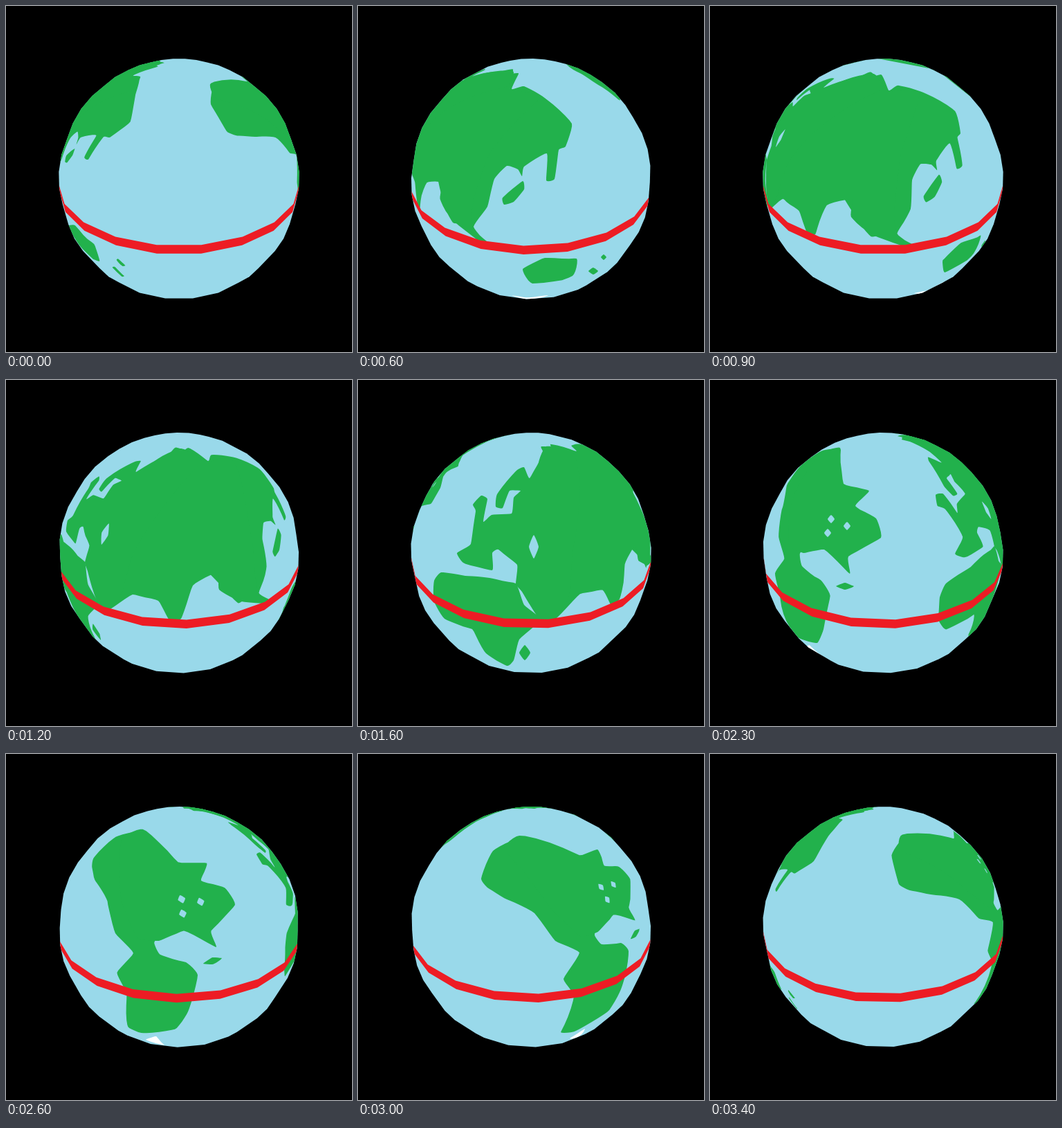
Write an HTML page with a canvas that moves like this. It is 500 px wide and 500 px high and loops after 3.5 s.

```html
<!DOCTYPE html>
<html lang="en">
<head>
<meta charset="utf-8">
<title>Spinning globe</title>
<style>
  html, body { margin: 0; width: 100%; height: 100%; overflow: hidden; background: #000; }
  canvas { display: block; width: 500px; height: 500px; }
</style>
</head>
<body>
<canvas id="stage" width="500" height="500"></canvas>
<script>
const ctx = document.getElementById('stage').getContext('2d');
const SEA = '#99d9ea', LAND = '#22b14c', LINE = '#ed1c24', ICE = '#fff';
const STEP_MS = 100, STEPS = 35, STEP_DEG = 10;
const SIDES = 20, CELL = 360 / SIDES, HALF = CELL / 2;
const C = 250, R = 174, DIST = 5, FOCAL = R * Math.sqrt(DIST * DIST - 1);
const rad = deg => deg * Math.PI / 180;
const COS_T = Math.cos(rad(30)), SIN_T = Math.sin(rad(30));

function spin([x, y, z], deg) {
  const c = Math.cos(rad(deg)), s = Math.sin(rad(deg));
  return [x * c + z * s, y, z * c - x * s];
}

function unit(p) {
  const len = Math.hypot(...p);
  return p.map(v => v / len);
}

function onSphere(lon, lat) {
  const r = Math.cos(rad(lat));
  return [Math.sin(rad(lon)) * r, Math.sin(rad(lat)), Math.cos(rad(lon)) * r];
}

// The globe is a mesh with flat sides, so points sink to the nearest one.
function facet([x, y, z]) {
  const lon = Math.atan2(x, z), mid = Math.round(lon / rad(CELL)) * rad(CELL);
  const k = Math.cos(rad(HALF)) / Math.cos(lon - mid);
  return [x * k, y, z * k];
}

const tilt = ([x, y, z]) => [x, y * COS_T - z * SIN_T, y * SIN_T + z * COS_T];

function project([x, y, z]) {
  const s = FOCAL / (DIST - z);
  return [C + x * s, C - y * s];
}

// Hidden points slide out to the limb.
function projectClamped(p) {
  if (p[2] > 1 / DIST) return project(p);
  const s = R * 1.01 / Math.hypot(p[0], p[1]);
  return [C + p[0] * s, C - p[1] * s];
}

function hitSphere(sx, sy) {
  const x = (sx - C) / FOCAL, y = (C - sy) / FOCAL, q = x * x + y * y;
  const root = Math.sqrt(Math.max(0, 1 - q * (DIST * DIST - 1)));
  const t = (DIST - root) / (1 + q);
  const py = t * y, pz = DIST - t;
  return unit([t * x, py * COS_T + pz * SIN_T, pz * COS_T - py * SIN_T]);
}

// Screen point at a given step back to a point on the globe.
function unproject(sx, sy, step) {
  const turn = step * STEP_DEG;
  let x = sx, y = sy, p;
  for (let i = 0; i < 3; i++) {
    p = spin(hitSphere(x, y), -turn);
    const [px, py] = project(tilt(spin(facet(p), turn)));
    x += sx - px;
    y += sy - py;
  }
  return p;
}

// Closed smooth outline on the globe through a few key points, placed as seen at one step.
function shape(color, step, xy) {
  const keys = [];
  for (let i = 0; i < xy.length; i += 2) keys.push(unproject(xy[i], xy[i + 1], step));
  const n = keys.length, points = [];
  keys.forEach((b, i) => {
    const a = keys[(i + n - 1) % n], c = keys[(i + 1) % n], d = keys[(i + 2) % n];
    for (let t = 0; t < 1; t += 1 / 6) {
      const h = t * t * (3 - 2 * t), u = t * (1 - t) * 0.2;
      points.push(facet(unit(b.map((v, j) =>
        v + (c[j] - v) * h + u * ((1 - t) * (c[j] - a[j]) - t * (d[j] - v))))));
    }
  });
  return { color, points };
}

const diamond = (color, step, x, y, w, h) =>
  shape(color, step, [x - w, y, x, y - h, x + w, y, x, y + h]);

const shapes = [
  // East Asia and Japan
  shape(LAND, 6, [
    200,103, 232,97, 222,120, 240,116, 270,133, 309,170, 300,203, 290,208, 284,250,
    272,252, 273,213, 240,232, 237,246, 231,236, 215,231, 197,250, 187,290, 167,319,
    187,341, 175,342, 155,315, 137,313, 121,275, 112,230, 120,160, 170,115]),
  shape(LAND, 6, [238,253, 240,265, 225,283, 211,287, 209,277]),
  // Central and South Asia
  shape(LAND, 12, [
    253,99, 292,118, 325,112, 350,200, 360,280, 365,312, 378,322, 340,320, 308,303,
    306,278, 270,297, 253,345, 236,347, 220,319, 183,310, 150,331, 165,290, 180,160,
    215,117]),
  // Europe and Arabia
  shape(LAND, 16, [
    265,96, 310,104, 320,150, 310,250, 305,312, 285,345, 262,345, 237,306, 228,295,
    230,267, 203,245, 194,250, 194,275, 152,264, 143,250, 163,237, 170,190, 166,180,
    178,167, 187,172, 181,205, 193,195, 222,193, 225,170, 235,160, 219,160, 209,185,
    199,183, 201,165, 230,130, 240,126, 248,142, 268,107]),
  diamond(SEA, 16, 254, 241, 7, 17),
  // Africa and Madagascar
  shape(LAND, 16, [
    110,290, 120,278, 155,283, 190,286, 228,294, 240,325, 264,346, 233,375, 225,405,
    215,413, 185,395, 165,360, 125,345, 110,320]),
  diamond(LAND, 16, 241, 394, 8, 11),
  // Oceania
  shape(LAND, 6, [238,380, 270,364, 316,365, 310,390, 252,401]),
  diamond(LAND, 6, 340, 383, 7, 5),
  diamond(LAND, 6, 355, 363, 4, 4),
  // The Americas
  shape(LAND, 30, [
    178,180, 195,140, 230,123, 262,131, 318,150, 340,185, 355,235, 345,243, 342,262,
    352,275, 380,273, 391,285, 380,340, 360,373, 315,400, 293,402, 312,350, 297,325,
    320,287, 285,270, 255,230, 215,210, 187,193]),
  shape(LAND, 23, [
    165,104, 188,98, 193,150, 230,160, 210,182, 240,200, 247,228, 200,255, 202,280,
    165,245, 135,250, 115,240, 115,190, 135,140]),
  diamond(LAND, 23, 195, 298, 13, 5),
  ...[[175, 201], [198, 211], [170, 221]].map(([x, y]) => diamond(SEA, 23, x, y, 5, 6)),
  // Ice
  shape(ICE, 30, [328,397, 306,411, 318,413]),
  shape(ICE, 6, [222,418, 250,421, 275,418, 250,424])
];

function hull(pts) {
  pts.sort((a, b) => a[0] - b[0] || a[1] - b[1]);
  const half = list => {
    const out = [];
    for (const p of list) {
      while (out.length > 1) {
        const [a, b] = out.slice(-2);
        if ((b[0] - a[0]) * (p[1] - a[1]) > (b[1] - a[1]) * (p[0] - a[0])) break;
        out.pop();
      }
      out.push(p);
    }
    return out.slice(0, -1);
  };
  return [...half(pts), ...half(pts.slice().reverse())];
}

function trace(pts) {
  ctx.beginPath();
  pts.forEach(([x, y]) => ctx.lineTo(x, y));
  ctx.closePath();
}

function drawEquator(turn) {
  const point = (lon, lat) => project(tilt(onSphere(lon, lat)));
  const wide = 2.15;
  ctx.fillStyle = LINE;
  ctx.beginPath();
  for (let i = 0; i < SIDES; i++) {
    const mid = turn + i * CELL, a = mid - HALF, b = mid + HALF;
    if (DIST * Math.cos(rad(mid)) * COS_T < Math.cos(rad(HALF))) continue;
    [point(a, wide), point(b, wide), point(b, -wide), point(a, -wide)]
      .forEach(([x, y], j) => j ? ctx.lineTo(x, y) : ctx.moveTo(x, y));
    ctx.closePath();
  }
  ctx.fill();
}

function draw(step) {
  const turn = step * STEP_DEG;
  const mesh = [];
  for (let lat = -90; lat <= 90; lat += HALF)
    for (let i = 0; i < SIDES; i++)
      mesh.push(project(tilt(onSphere(turn + HALF + i * CELL, lat))));

  ctx.fillStyle = '#000';
  ctx.fillRect(0, 0, 500, 500);
  ctx.save();
  trace(hull(mesh));
  ctx.clip();
  ctx.fillStyle = SEA;
  ctx.fillRect(0, 0, 500, 500);
  for (const { color, points } of shapes) {
    const view = points.map(p => tilt(spin(p, turn)));
    if (view.every(p => p[2] <= 1 / DIST)) continue;
    trace(view.map(projectClamped));
    ctx.fillStyle = color;
    ctx.fill();
  }
  drawEquator(turn);
  ctx.restore();
}

let shown = -1;
function tick() {
  const step = Math.floor(performance.now() / STEP_MS) % STEPS;
  if (step !== shown) draw(shown = step);
  requestAnimationFrame(tick);
}
tick();
</script>
</body>
</html>
```
